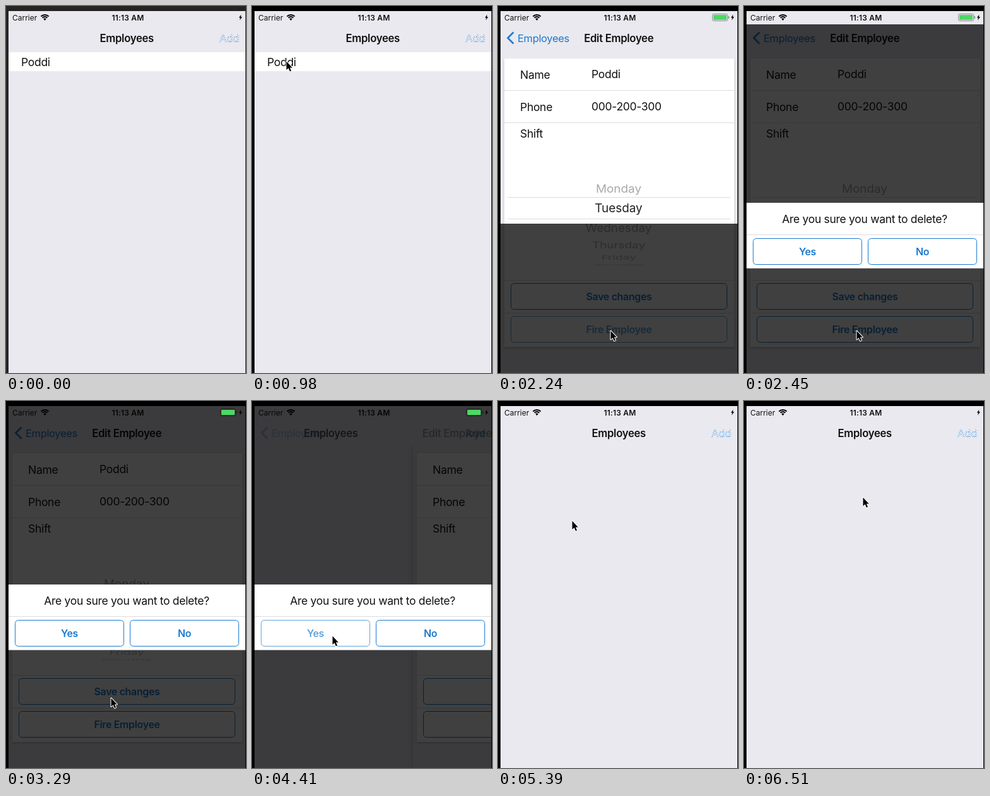
Recreate the animation shown at these times as an HTML page with a canvas. Size 380 px wide and 580 px high, loop 6580 ms.

```html
<!DOCTYPE html>
<html lang="en">
<head>
<meta charset="utf-8">
<style>
  html, body { margin: 0; width: 100%; height: 100%; overflow: hidden; background: #000; }
  canvas { display: block; width: 380px; height: 580px; }
</style>
</head>
<body>
<canvas id="stage" width="380" height="580"></canvas>
<script>
const ctx = document.getElementById('stage').getContext('2d');
const LOOP = 6580, TICK = 70;
const BLUE = '#1b7ad0', INK = '#111', PAGE = '#eae9ef', LINE = '#dcdce0';
const SCREEN = { x: 4, y: 8, w: 375, h: 572 };
const PERSON = 'Poddi', PHONE = '000-200-300';
const PUSH = 985, MODAL_IN = 2150, POP = 4300, MODAL_OUT = 4827.6, MODAL_GONE = 5330;

// time, x, y of the pointer tip
const POINTER = [
  [70, 350, 536], [420, 190, 290], [700, 56, 90], [980, 54, 87], [1190, 54, 87],
  [1400, 57, 109], [1980, 178, 513], [2960, 178, 513], [3290, 166, 469],
  [3560, 127, 371], [4930, 127, 371], [5600, 110, 125], [5950, 90, 112],
  [6300, 157, 133], [6510, 188, 152]
];

const clamp = v => Math.max(0, Math.min(1, v));

function bezier(x1, y1, x2, y2) {
  const at = (a, b, s) => 3 * (1 - s) ** 2 * s * a + 3 * (1 - s) * s * s * b + s ** 3;
  return x => {
    if (x <= 0) return 0;
    if (x >= 1) return 1;
    let lo = 0, hi = 1;
    for (let i = 0; i < 24; i++) {
      const mid = (lo + hi) / 2;
      if (at(x1, x2, mid) < x) lo = mid; else hi = mid;
    }
    return at(y1, y2, lo);
  };
}
const slideEase = bezier(0.2833, 0.99, 0.31833, 0.99);
const sheetEase = bezier(0.38, 0.7, 0.125, 1);

// Monotone cubic interpolation along one axis of the pointer path
function pointerAxis(t, axis) {
  const last = POINTER.length - 1;
  if (t >= POINTER[last][0]) return POINTER[last][axis];
  let i = 0;
  while (t >= POINTER[i + 1][0]) i++;
  const slope = k => k < 0 || k >= last ? 0 :
    (POINTER[k + 1][axis] - POINTER[k][axis]) / (POINTER[k + 1][0] - POINTER[k][0]);
  const tangent = k => {
    const a = slope(k - 1), b = slope(k);
    return a * b <= 0 ? 0 : 2 * a * b / (a + b);
  };
  const [p, q] = [POINTER[i], POINTER[i + 1]];
  const h = q[0] - p[0], s = (t - p[0]) / h;
  return p[axis] * (1 + 2 * s) * (1 - s) ** 2 + q[axis] * s * s * (3 - 2 * s) +
    h * (tangent(i) * s * (1 - s) ** 2 - tangent(i + 1) * s * s * (1 - s));
}

function rect(x, y, w, h, color) {
  ctx.fillStyle = color;
  ctx.fillRect(x, y, w, h);
}

function shadowRect(x, y, w, h, color, blur, dy) {
  ctx.save();
  ctx.shadowColor = 'rgba(0,0,0,0.18)';
  ctx.shadowBlur = blur;
  ctx.shadowOffsetY = dy;
  rect(x, y, w, h, color);
  ctx.restore();
}

function setFont(size, weight, tracking) {
  ctx.font = `${weight} ${size}px Inter, sans-serif`;
  ctx.letterSpacing = tracking + 'px';
}

function text(str, x, y, { size = 17.5, weight = 400, color = INK, align = 'left', tracking = -0.3 } = {}) {
  setFont(size, weight, tracking);
  ctx.textAlign = align;
  ctx.fillStyle = color;
  ctx.fillText(str, x, y);
}

function polygon(points) {
  ctx.beginPath();
  points.forEach(([x, y]) => ctx.lineTo(x, y));
  ctx.closePath();
}

function withAlpha(alpha, draw) {
  ctx.save();
  ctx.globalAlpha *= alpha;
  draw();
  ctx.restore();
}

function button(label, x, y, w, alpha = 1) {
  withAlpha(alpha, () => {
    ctx.beginPath();
    ctx.roundRect(x + 0.5, y + 0.5, w - 1, 41, 5);
    ctx.fillStyle = '#fff';
    ctx.fill();
    ctx.strokeStyle = BLUE;
    ctx.lineWidth = 1;
    ctx.stroke();
    text(label, x + w / 2, y + 26.5, { size: 15.9, weight: 600, color: BLUE, align: 'center' });
  });
}

// Button opacity: dims while held, then fades back
function pressAlpha(t, down, up) {
  if (t < down) return 1;
  return t < up ? 0.3 : 0.3 + 0.7 * clamp((t - up) / 250);
}

function listScreen(shift, hasRow) {
  ctx.save();
  ctx.translate(shift, 0);
  rect(SCREEN.x, SCREEN.y, SCREEN.w, SCREEN.h, PAGE);
  if (hasRow) {
    rect(SCREEN.x, 73, SCREEN.w, 30, '#fff');
    text(PERSON, 24, 94.5);
  }
  ctx.restore();
}

function picker() {
  const days = ['Monday', 'Tuesday', 'Wednesday', 'Thursday', 'Friday', 'Saturday'];
  const greys = ['#a9a9ac', '#222', '#a9a9ac', '#b0b0b3', '#bcbcbf', '#cacacc'];
  days.forEach((day, i) => {
    const angle = (i - 1) * Math.PI / 9;
    ctx.save();
    ctx.translate(191, 319.5 + 90.6 * Math.sin(angle));
    ctx.scale(1, Math.cos(angle));
    text(day, 0, 6.5, { size: 18.9, color: greys[i], align: 'center', tracking: 0 });
    ctx.restore();
  });
  rect(15, 302, 353, 1, LINE);
  rect(15, 336, 353, 1, LINE);
}

function editScreen(shift, t) {
  ctx.save();
  ctx.translate(shift, 0);
  shadowRect(SCREEN.x, SCREEN.y, SCREEN.w, SCREEN.h, PAGE, 8, 0);
  shadowRect(10, 83, 364, 456, '#fff', 3, 2);
  [133, 184, 433, 485].forEach(y => rect(10, y, 364, 1, LINE));
  text('Name', 35, 115);
  text(PERSON, 148, 114);
  text('Phone', 35, 166);
  text(PHONE, 148, 165);
  text('Shift', 35, 207.5);
  picker();
  button('Save changes', 20, 438, 343);
  button('Fire Employee', 20, 490, 343, pressAlpha(t, 2030, 2100));
  ctx.restore();
}

function addButton(crisp) {
  if (crisp) return text('Add', 338, 56.5, { size: 16.5, color: BLUE, tracking: -0.1 });
  ctx.save();
  setFont(16.5, 400, -0.1);
  ctx.textAlign = 'left';
  ctx.strokeStyle = '#3f93dd';
  ctx.lineWidth = 0.7;
  ctx.setLineDash([1.4, 1.8]);
  ctx.strokeText('Add', 338, 56.5);
  ctx.restore();
}

function header(depth, crisp) {
  const title = { size: 16.7, weight: 600, align: 'center', tracking: -0.3 };
  rect(SCREEN.x, SCREEN.y, SCREEN.w, 64, PAGE);
  withAlpha(1 - depth, () => {
    text('Employees', 191.2 - 200 * depth, 56.5, title);
    addButton(crisp);
  });
  withAlpha(depth, () => {
    text('Edit Employee', 191.2 + 200 * (1 - depth), 56.5, title);
    text('Employees', 31, 56.5, { size: 16.5, color: BLUE, tracking: -0.35 });
    ctx.beginPath();
    ctx.moveTo(24.5, 41.5);
    ctx.lineTo(15.5, 50.5);
    ctx.lineTo(24.5, 59.5);
    ctx.strokeStyle = BLUE;
    ctx.lineWidth = 2.6;
    ctx.stroke();
  });
}

function statusBar() {
  text('Carrier', 10, 22.5, { size: 12, tracking: 0 });
  text('11:13 AM', 193, 22.5, { size: 12, weight: 600, align: 'center', tracking: 0.2 });
  ctx.strokeStyle = ctx.fillStyle = '#000';
  ctx.lineWidth = 2;
  for (const radius of [8.6, 5.4]) {
    ctx.beginPath();
    ctx.arc(61.5, 22.5, radius, -Math.PI * 0.75, -Math.PI * 0.25);
    ctx.stroke();
  }
  ctx.beginPath();
  ctx.moveTo(61.5, 23);
  ctx.arc(61.5, 22.5, 3, -Math.PI * 0.75, -Math.PI * 0.25);
  ctx.fill();
  polygon([[372.4, 13.5], [368.8, 18.6], [371, 18.6], [370, 22.5], [374, 17.2], [371.7, 17.2]]);
  ctx.fill();
}

function batteryShell() {
  ctx.beginPath();
  ctx.roundRect(339.5, 12.5, 24, 11, 2.5);
  ctx.strokeStyle = '#8d8d91';
  ctx.lineWidth = 1;
  ctx.stroke();
  rect(364.5, 16, 1.5, 4, '#8d8d91');
}

function batteryFill() {
  ctx.beginPath();
  ctx.roundRect(341, 14, 21, 8, 1);
  ctx.fillStyle = '#4cd964';
  ctx.fill();
}

function sheet(offset, t) {
  ctx.save();
  ctx.translate(0, offset);
  rect(SCREEN.x, SCREEN.y, SCREEN.w, SCREEN.h, 'rgba(0,0,0,0.75)');
  rect(SCREEN.x, 290, SCREEN.w, 103, '#fff');
  rect(SCREEN.x, 340, SCREEN.w, 1, LINE);
  rect(SCREEN.x, 393, SCREEN.w, 1, '#b5b5b8');
  text('Are you sure you want to delete?', 191, 321.5, { align: 'center' });
  button('Yes', 14, 346, 173, pressAlpha(t, 4130, 4270));
  button('No', 196, 346, 173);
  ctx.restore();
}

function pointer(x, y) {
  ctx.save();
  ctx.translate(x + 0.5, y + 0.5);
  polygon([[0, 0], [0, 13.6], [3.2, 10.8], [5.4, 15.8], [7.6, 14.9], [5.4, 10], [9.4, 10]]);
  ctx.lineJoin = 'round';
  ctx.lineWidth = 2;
  ctx.strokeStyle = '#fff';
  ctx.stroke();
  ctx.fillStyle = '#000';
  ctx.fill();
  ctx.restore();
}

function draw(t) {
  const depth = slideEase((t - PUSH) / 500) - slideEase((t - POP) / 500);
  const raised = sheetEase((t - MODAL_IN) / 500) - sheetEase((t - MODAL_OUT) / 500);
  const crisp = t > PUSH && t < MODAL_GONE;

  rect(0, 0, 380, 580, t < 770 ? '#252423' : '#000');
  ctx.save();
  ctx.beginPath();
  ctx.rect(SCREEN.x, SCREEN.y, SCREEN.w, SCREEN.h);
  ctx.clip();
  listScreen(-0.3 * SCREEN.w * depth, t < POP);
  if (depth > 0) editScreen(Math.round(SCREEN.w * (1 - depth)), t);
  header(depth, crisp);
  statusBar();
  if (crisp) batteryShell();
  if (raised > 0) sheet(Math.round(SCREEN.h * (1 - raised)), t);
  if (crisp) batteryFill();
  if (t >= POINTER[0][0]) pointer(Math.round(pointerAxis(t, 1)), Math.round(pointerAxis(t, 2)));
  ctx.restore();
}

const start = performance.now();
function frame() {
  const t = (performance.now() - start) % LOOP;
  draw(Math.floor(t / TICK) * TICK);
  requestAnimationFrame(frame);
}
frame();
</script>
</body>
</html>
```
